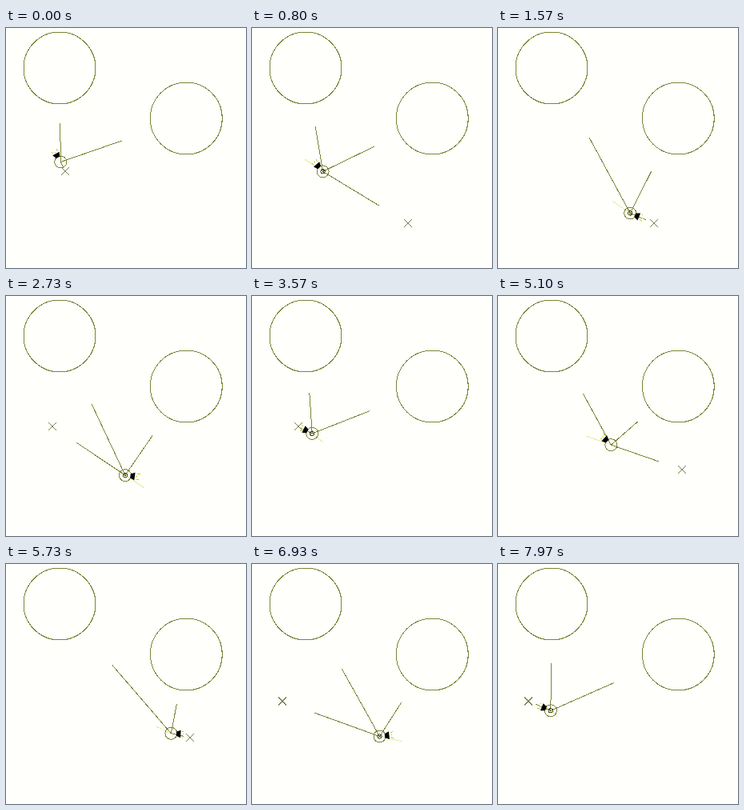
Recreate the animation shown at these times as an HTML page. Size 300 by 300 pixels, loop 8000 ms.

```html
<!DOCTYPE html>
<html lang="en">
<head>
<meta charset="utf-8">
<title>Thruster craft</title>
<style>
  html, body { margin: 0; width: 100%; height: 100%; overflow: hidden; background: #fffffb; }
  svg { display: block; width: 100vw; height: 100vh; }
  .ink { fill: none; stroke: #7e8438; stroke-width: 1; shape-rendering: crispEdges; }
  #wake { stroke: #e8eaa8; }
  #cross { stroke: #7c8054; }
  #core { stroke: #44481c; }
  #spray { stroke: #c4c43c; }
</style>
</head>
<body>
<svg viewBox="0 0 300 300">
  <g id="obstacles"></g>
  <path class="ink" id="cross" d="M-5-5 5 5M-5 5 5-5"/>
  <path class="ink" id="wake"/>
  <path class="ink" id="sensors"/>
  <g id="craft">
    <circle class="ink" r="7.5"/>
    <g id="core" class="ink"><circle r="2.6"/><path d="M-1 0H1"/></g>
    <g id="nozzle">
      <path d="M6.5-2.6 12-4.8V4.8L6.5 2.6Z"/>
      <path class="ink" id="spray"/>
    </g>
  </g>
</svg>
<script>
const LOOP = 8000, RADIUS = 45;
const REACH = 2 / 3;      // sensor lines stop short of what they point at
const LEAD = 270;         // a goal shows this long before the craft turns to it
const BRAKE = 0.55;       // share of a flight after which the craft brakes
const DOWNDRAFT = 0.45;   // push of the obstacles from above
const obstacles = [[67, 50], [225.3, 113]];

// Each flight eases from the previous stop to its own, sagging on the way.
const launch = [72.6, 174];
const flights = [
  { start: -500, takes: 830, stop: [66, 164], sag: 0, goal: [74, 179] },
  { start: 330, takes: 1715, stop: [188, 247], sag: 0, goal: [195, 244], core: true },
  { start: 2045, takes: 1805, stop: [67.5, 164.5], sag: 4, goal: [58, 163], core: true },
  { start: 4170, takes: 1890, stop: [218.5, 219], sag: -5, goal: [230, 217] },
  { start: 6060, takes: 2080, stop: [63, 179], sag: 12, goal: [38, 171.5], core: true }
];

const el = id => document.getElementById(id);
const set = (id, name, value) => el(id).setAttribute(name, value);
const ray = (x, y, dx, dy) => `M${x} ${y}l${dx} ${dy}`;
const noise = n => { const s = Math.sin(n * 127.1) * 43758.5; return s - Math.floor(s); };
const flightAt = t => Math.max(0, flights.findLastIndex(f => f.start <= t));
const progress = (f, t) => Math.min(1, Math.max(0, (t - f.start) / f.takes));

function position(t) {
  const i = flightAt(t), f = flights[i];
  const [x, y] = i ? flights[i - 1].stop : launch;
  const u = progress(f, t), eased = u * u * (3 - 2 * u);
  return [
    x + (f.stop[0] - x) * eased,
    y + (f.stop[1] - y) * eased + f.sag * 4 * u * (1 - u)
  ];
}

// The nozzle faces the goal to brake, and away from the push to speed up.
function exhaust(t) {
  const f = flights[flightAt(t + LEAD)], [x, y] = position(t);
  const dx = f.goal[0] - x, dy = f.goal[1] - y, d = Math.hypot(dx, dy);
  return progress(f, t) > BRAKE ? [dx / d, dy / d] : [-dx / d, -dy / d - DOWNDRAFT];
}

function nozzleAngle(t) {
  let x = 0, y = 0;
  for (let shift = -120; shift <= 120; shift += 60) {
    const [ex, ey] = exhaust(t + shift);
    x += ex;
    y += ey;
  }
  return Math.atan2(y, x) * 180 / Math.PI;
}

function draw(t) {
  const [x, y] = position(t), past = position(t - 10), next = position(t + 10);
  const { goal } = flights[flightAt(t + LEAD)];

  let lines = ray(x, y, (goal[0] - x) * REACH, (goal[1] - y) * REACH);
  for (const [ox, oy] of obstacles) {
    const dx = ox - x, dy = oy - y;
    const k = REACH * (1 - RADIUS / Math.hypot(dx, dy));
    lines += ray(x, y, dx * k, dy * k);
  }
  set('sensors', 'd', lines);
  set('wake', 'd', ray(x, y, (past[0] - next[0]) * 13, (past[1] - next[1]) * 13));
  set('cross', 'transform', `translate(${goal})`);
  set('craft', 'transform', `translate(${x} ${y})`);
  set('nozzle', 'transform', `rotate(${nozzleAngle(t)})`);

  const step = Math.floor(t / 33);
  set('spray', 'd', [-3, 0, 3].map(row =>
    ray(13 + 2 * noise(step + row * 7), row, 1.5 + 2.5 * noise(step * 3 + row), row / 4)).join(''));
  el('core').style.display = flights[flightAt(t)].core ? '' : 'none';
}

el('obstacles').innerHTML = obstacles.map(([x, y]) =>
  `<circle class="ink" cx="${x}" cy="${y}" r="${RADIUS}"/>`).join('');

const start = performance.now();
function tick() {
  draw((performance.now() - start) % LOOP);
  requestAnimationFrame(tick);
}
tick();
</script>
</body>
</html>
```
